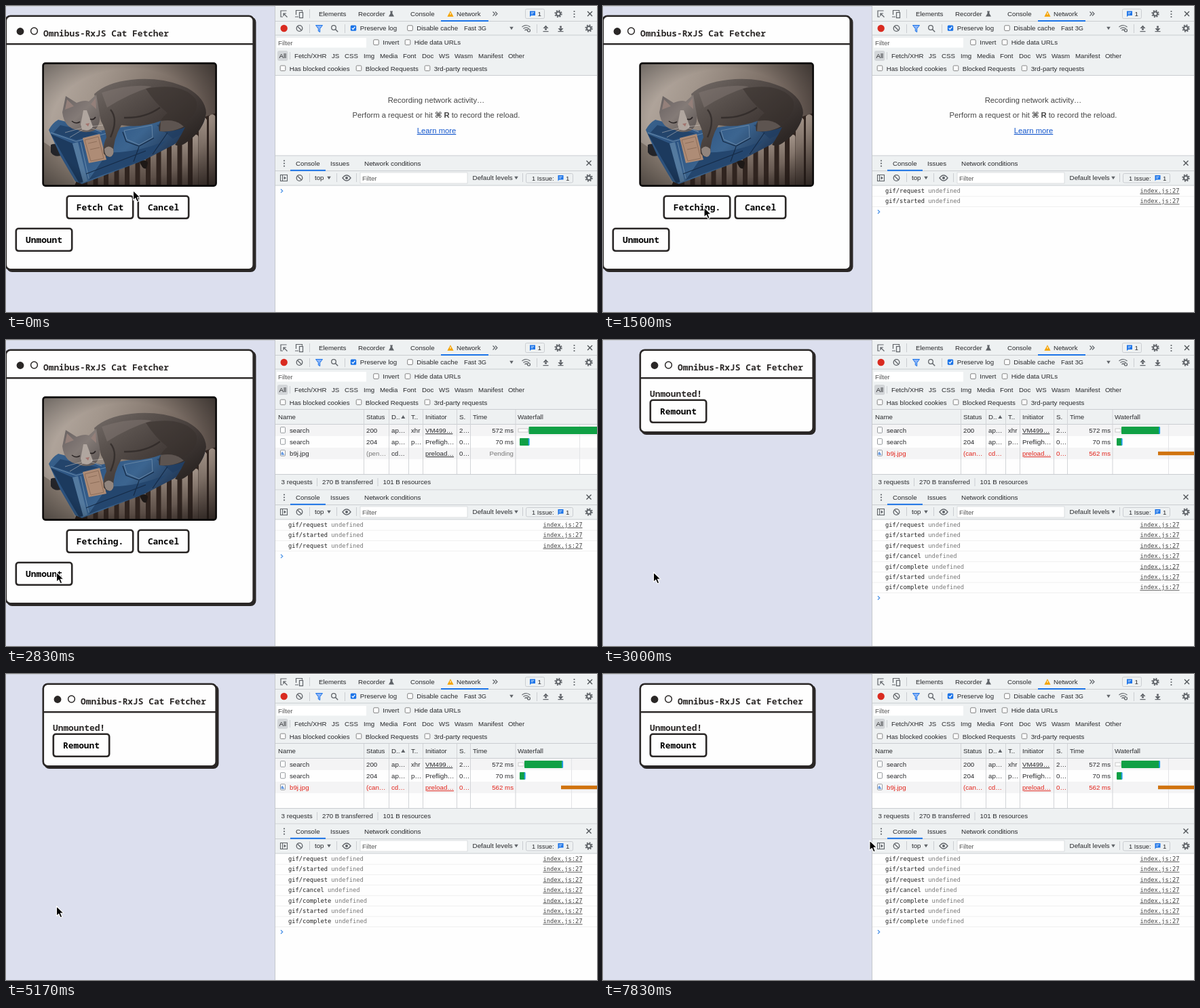
An HTML page that plays this animation: 871x452 px, repeating every 8000 ms.

```html
<!DOCTYPE html>
<html lang="en">
<head>
<meta charset="utf-8">
<title>Cat Fetcher</title>
<style>
  html, body { margin: 0; width: 100%; height: 100%; overflow: hidden; background: #dcdfee; }
  svg { display: block; width: 871px; height: 452px; }
  text { font: 9.7px "Liberation Sans", "DejaVu Sans", sans-serif; white-space: pre; }
  .app { font: 600 12.85px "Noto Sans Mono", "DejaVu Sans Mono", monospace; }
  .button { font-weight: 700; }
  .log { font: 8.78px "DejaVu Sans Mono", monospace; }
  .link { text-decoration: underline; }
</style>
</head>
<body>
<svg id="stage" viewBox="0 0 871 452"></svg>
<script>
const INK = '#2a2726', ICON = '#5f6368', TEXT = '#28292c', GRAY = '#777', BLUE = '#1a73e8', RED = '#e2231a';
const GREEN = '#10a045', LINE = '#cacdd1', PANEL = '#eef1f2', PAPER = '#fefefe';

// Drawing helpers: each returns SVG markup.
const rect = (x, y, w, h, fill, extra = '') =>
  `<rect x="${x}" y="${y}" width="${w}" height="${h}" fill="${fill}" ${extra}/>`;
const circle = (x, y, r, fill, extra = '') => `<circle cx="${x}" cy="${y}" r="${r}" fill="${fill}" ${extra}/>`;
const path = (d, fill, extra = '') => `<path d="${d}" fill="${fill}" ${extra}/>`;
const stroke = (d, color = ICON, width = 1.2, extra = '') =>
  path(d, 'none', `stroke="${color}" stroke-width="${width}" ${extra}`);
const text = (x, y, s, fill = TEXT, extra = '') => `<text x="${x}" y="${y}" fill="${fill}" ${extra}>${s}</text>`;
const sized = px => `style="font-size:${px}px"`;
const group = (id, content) => `<g id="${id}">${content}</g>`;
const hline = (y, color = LINE) => rect(397, y, 474, 1, color);
const vline = (x, y, h, color = LINE) => rect(x, y, 1, h, color);

// Icons
const gear = (x, y) => circle(x, y, 3, 'none', `stroke="${ICON}" stroke-width="2"`) +
  circle(x, y, 4.8, 'none', `stroke="${ICON}" stroke-width="1.8" stroke-dasharray="1.9 1.87"`);
const cross = (x, y) => stroke(`M${x - 3.5} ${y - 3.5}l7 7m0-7l-7 7`, '#4b4f53', 1.3);
const dots = (x, y) => [-4, 0, 4].map(d => circle(x, y + d, 1.1, ICON)).join('');
const clearIcon = (x, y) => circle(x, y, 4.3, 'none', `stroke="${ICON}" stroke-width="1.3"`) +
  stroke(`M${x - 3} ${y - 3}l6 6`, ICON, 1.3);
const triangle = (x, y) => path(`M${x - 2.8} ${y - 2.3}h5.6l-2.8 4.6z`, ICON);
const checkbox = (x, y, on) => on
  ? rect(x - 4.2, y - 4.2, 8.4, 8.4, BLUE, 'rx="1.5"') + stroke(`M${x - 2.3} ${y}l1.7 1.9l3-3.9`, '#fff', 1.3)
  : rect(x - 3.8, y - 3.8, 7.6, 7.6, '#fff', 'rx="1.3" stroke="#767676" stroke-width=".9"');
const message = (x, y) => path(`M${x} ${y}h8v6.5h-6l-2 2z`, BLUE) +
  stroke(`M${x + 1.7} ${y + 2.2}h4.6m-4.6 2h3`, '#fff', .8);
const arrowIcon = (x, y, dir) => path(`M${x - 4} ${y}h8l-4 ${-4.5 * dir}zM${x - 1.4} ${y - .5}h2.8v${3 * dir}h-2.8z`, ICON) +
  rect(x - 4, y + 4, 8, 1.2, ICON);

// Left-hand application: boxes are given by the centre line of their border.
const border = `stroke="${INK}" stroke-width="2.6"`;
const windowFrame = (x, w, h) =>
  rect(x + 2, 16, w + 1, h + 1, INK, 'rx="8"') +
  rect(x + .8, 14.8, w - 1.6, h - 1.6, PAPER, `rx="6.7" ${border}`) +
  rect(x + 1, 55, w - 2, 2.4, INK) +
  circle(x + 22, 37.5, 5.4, INK) +
  circle(x + 42.5, 37, 4.9, PAPER, `stroke="${INK}" stroke-width="1.5"`) +
  text(x + 56, 44.5, 'Omnibus-RxJS Cat Fetcher', INK, 'class="app"');
const button = (x, y, w, label, id = '') =>
  rect(x + .8, y + .8, w - 1.6, 33, PAPER, `rx="3.7" ${border}`) +
  text(x + w / 2, y + 21.5, label, '#000', `class="app button" text-anchor="middle" ${id && `id="${id}"`}`);

const gradient = (id, end, ...colors) => `<linearGradient id="${id}" ${end}>` +
  colors.map((c, i) => `<stop offset="${i / (colors.length - 1)}" stop-color="${c}"/>`).join('') + '</linearGradient>';

function photo() {
  let ribs = '';
  for (let x = 120, i = 0; x < 285; x += 15.5, i++)
    ribs += rect(x, 190, 8.5, 80, 'url(#rib)', 'rx="4"');
  const jeans = 'M63 183Q68 173 77 168L140 184L215 172L289 157L294 161Q293 174 284 181L247 205L203 228L112 263L102 259L80 221Z';
  return '<defs>' +
    gradient('wall', 'x2="1" y2=".35"', '#bcb1a8', '#a3978d', '#80736a', '#5c504a') +
    gradient('rib', 'x2="0" y2="1"', '#a39489', '#75675e', '#4b3e38') +
    gradient('denim', 'x2=".9" y2=".4"', '#3c658e', '#2c5381', '#3c6590', '#1d3250') +
    gradient('fur', 'x2=".8" y2=".8"', '#756d69', '#5a524e', '#453d3a', '#2d2725') +
    gradient('face', 'x2="1" y2="1"', '#676060', '#847b77', '#5a5351') +
    `<radialGradient id="shade" r=".75"><stop offset=".6" stop-opacity="0"/><stop offset="1" stop-opacity=".5"/></radialGradient>
    <filter id="soft"><feGaussianBlur stdDeviation=".6"/></filter>
    <clipPath id="frame"><rect x="54" y="84" width="256" height="182" rx="4"/></clipPath></defs>
  <g clip-path="url(#frame)">` +
    rect(54, 84, 256, 182, 'url(#wall)') +
    `<g filter="url(#soft)">` +
    path('M54 200L84 220L104 268H54Z', '#85796f') +
    path('M104 258L215 215L289 165L310 158V268H100Z', '#30241f') + ribs +
    path('M284 168q7-8 12 0V268h-12zM299 163q5-6 10 0V268h-10z', 'url(#rib)') +
    path('M66 205q8-4 16 4l-1 12q-10 3-15-5z', '#25262b') +
    path(jeans, 'url(#denim)') +
    path('M66 189L98 203L117 258L108 262L87 226Z', '#1c3a5e') +
    path('M98 203l8-2l14 57l-6 3z', '#547a9f') +
    path('M80 176L136 188L104 198L70 187Z', '#23446b') +
    path('M150 216Q190 218 236 199L204 227L122 257Z', '#24466e') +
    path('M222 176L290 159Q288 174 246 196Z', '#203c60', 'opacity=".7"') +
    stroke('M66 187l37 13l61-16M110 201l12 54', '#6f90af', .9) +
    stroke('M174 184l41-8l1 18l-20 11l-18-8z', '#7290ad', .8) +
    stroke('M172 186l5 14l19 7l22-12M196 208l-8 22M238 187l-22 32M118 248l88-34', '#152b47', 1.2) +
    path('M197 230q10-5 12 2l-2 8q-6 2-10-10z', '#1d1816') +
    path('M113 195L138 189L148 227L122 232Z', '#ae8c76') +
    stroke('M116 198l20-5l8 32l-19 4zM121 203l13-3M124 212l14-3', '#8a6a56', .9) +
    path('M130 130Q148 113 184 109Q230 104 267 121Q294 136 295 158Q291 184 268 200Q257 209 249 205Q258 192 264 179Q245 187 226 185Q224 176 230 169Q199 181 170 176Q158 196 158 219Q151 227 144 218Q142 207 148 194Q146 180 140 170Z', 'url(#fur)') +
    path('M206 122Q260 112 279 137Q288 157 258 176Q233 179 226 184Q222 171 238 158Q219 143 206 122Z', '#38302d', 'opacity=".55"') +
    path('M141 128Q183 114 215 119Q180 130 149 150Z', '#857b76', 'opacity=".45"') +
    path('M228 170Q250 166 262 178Q246 187 227 185Z', '#5d5450') +
    stroke('M154 153Q166 167 154 194M174 165Q205 166 227 150', '#2c2624', 2.4, 'opacity=".7"') +
    path('M145 211q6-7 13 0q2 10-5 12q-8-1-8-12z', '#91857e') +
    path('M83 157L88 133L104 143Q116 138 122 141L133 131L137 154Q142 173 130 184Q116 189 106 183Q86 181 83 157Z', 'url(#face)') +
    path('M87 153L90 138L100 148ZM125 145L132 136L133 152Z', '#94807a') +
    path('M114 154L119 154L128 178Q122 187 112 182L110 175Z', '#b0a69f') +
    stroke('M97 170q6 5 12 1M124 167q5 2 8-3', '#2a2424', 1.6) +
    path('M117 174l6-1l-2 5z', '#a2746e') + '</g>' +
    stroke('M112 180l-25 7M114 182l-20 12M125 178l18-2M125 180l16 6', '#ddd6cf', .6, 'opacity=".8"') +
    rect(54, 84, 256, 182, 'url(#shade)') + '</g>' +
    rect(54.6, 84.6, 255, 181, 'none', 'rx="3.5" stroke="#0b0909" stroke-width="2.6"');
}

const mounted = group('mounted', windowFrame(-1, 366.5, 376) + photo() +
  button(89, 280, 99, 'Fetch Cat', 'fetch') + button(194, 280, 76, 'Cancel') + button(14, 328, 84, 'Unmount'));
const unmounted = group('unmounted', windowFrame(54, 256.5, 123) +
  text(69, 83.5, 'Unmounted!', INK, 'class="app"') + button(69, 88, 84, 'Remount'));

// Developer tools that never change
const filterTypes = { 'Fetch/XHR': 425, JS: 480, CSS: 499, Img: 527, Media: 551, Font: 585, Doc: 613,
  WS: 638, Wasm: 661, Manifest: 696, Other: 740 };
const labelled = (x, y, label, on) => checkbox(x, y - 3.6, on) + text(x + 9.7, y, label);

const chrome = rect(0, 0, 871, 1, '#cfd1d8') + rect(396, 0, 475, 452, PAPER) + vline(396, 0, 452, '#c5c8cc') +
  rect(397, 1, 474, 101, PANEL) + hline(22) + hline(42.5) + hline(102) +
  stroke('M413 7.5v-.5h-8v9h3M409 11l5.5 5.5M409 15v-4h4') +
  stroke('M427.5 13V6.5h9v2M426 16h5') + rect(432.5, 9.5, 5, 8, PANEL, `stroke="${ICON}" stroke-width="1.2"`) +
  vline(447, 5, 13) + text(461, 15, 'Elements') + text(519, 15, 'Recorder') +
  path('M566 7.5h4v1h-.6v2.5l2.6 4.5h-8l2.6-4.5V8.5h-.6z', ICON) +
  text(596, 15, 'Console') + path('M655 7.3l4.6 8.5h-9.2z', '#f5a300') + rect(654.5, 10, 1, 3, '#fff') +
  text(664, 15, 'Network') + rect(641, 21, 70, 2, BLUE) +
  stroke('M717.5 8.5l3 3l-3 3m3.5-6l3 3l-3 3') +
  rect(765.5, 4.5, 28, 14, PANEL, `rx="2" stroke="${LINE}"`) + message(772, 7.5) + text(783.5, 15, '1') +
  gear(814, 11.5) + dots(837.5, 12) + cross(860.5, 11.5) +

  circle(409.7, 33, 5.2, '#d92b20') + clearIcon(432.5, 33) + vline(447, 27, 13) +
  path('M456.5 28.5h10l-3.8 5v5l-2.4-1.4v-3.6z', '#8ab4f8', `stroke="${BLUE}"`) +
  circle(483, 32, 3.3, 'none', `stroke="${ICON}" stroke-width="1.3"`) + stroke('M485.5 34.5l3.7 3.7', ICON, 1.4) +
  vline(499, 27, 13) + labelled(512, 36.2, 'Preserve log', true) + labelled(595.5, 36.2, 'Disable cache') +
  text(675, 36.4, 'Fast 3G', TEXT, sized(9.3)) + triangle(745, 33) +
  stroke('M760.5 31q6-5 12 0M762.5 33.5q4-3.3 8 0M764.5 36q2-2 4 0', ICON, 1.2) +
  circle(770.5, 36, 2, PANEL, `stroke="${ICON}" stroke-width="1.2"`) +
  vline(782, 27, 13) + arrowIcon(795.5, 33, 1) + arrowIcon(817.5, 33, -1) + gear(859, 33) +

  rect(399, 47, 132, 14.5, '#fff') + text(401, 58, 'Filter', '#555') +
  labelled(545.5, 57.2, 'Invert') + labelled(592, 57.2, 'Hide data URLs') +
  rect(400, 66, 15.5, 15, '#d3d6d9', 'rx="3"') + text(402.5, 76.5, 'All') + vline(418, 68, 11) +
  Object.entries(filterTypes).map(([label, x]) => text(x, 76.5, label)).join('') +
  labelled(408, 95.5, 'Has blocked cookies') + labelled(520, 95.5, 'Blocked Requests') +
  labelled(621, 95.5, '3rd-party requests') +

  rect(397, 221, 474, 44, PANEL) + hline(220.5) + hline(243) + hline(264.5) + dots(410, 232.5) +
  text(427, 235.7, 'Console') + rect(419, 241.8, 52, 2, BLUE) + text(478, 235.7, 'Issues') +
  text(528, 235.7, 'Network conditions', TEXT, sized(9.9)) + cross(859, 232) +
  rect(404.5, 249.5, 10, 9, 'none', `stroke="${ICON}" stroke-width="1.1"`) + vline(407, 249, 9, ICON) +
  path('M409.5 251.5v5l3.5-2.5z', ICON) + clearIcon(432.5, 254) + vline(447, 247, 13) +
  text(455, 257.3, 'top') + triangle(476, 254) + vline(487, 247, 13) +
  stroke('M496 254q6-8 12 0q-6 8-12 0z', ICON, 1.3) + circle(502, 254, 2, ICON) + vline(516, 247, 13) +
  rect(522, 246, 158, 16, '#fff', `stroke="${LINE}" stroke-width=".6"`) + text(525, 257.5, 'Filter', '#555') +
  text(687.5, 257.3, 'Default levels', TEXT, sized(9.9)) + triangle(752, 254) + vline(761, 247, 13) +
  rect(766.5, 247.5, 69, 13.5, PANEL, `rx="2" stroke="${LINE}"`) + text(775, 257.5, '1 Issue:', TEXT, sized(9.3)) +
  message(813.5, 250) + text(825, 257.5, '1') + gear(859, 254);

const middle = `text-anchor="middle" style="font-size:11.25px"`;
const idle = group('idle',
  text(634, 143, 'Recording network activity…', '#444', middle) +
  text(634, 165.3, 'Perform a request or hit <tspan font-weight="bold">⌘ R</tspan> to record the reload.', '#444', middle) +
  text(634.5, 188, 'Learn more', '#1155cc', middle + ' class="link"'));

// Network table
function tableRow(i, [name, status, domain, type, initiator, size, time], color = TEXT) {
  const base = 137.2 + 17 * i, icon = base - 8.5;
  const pending = time === 'Pending' ? GRAY : color;
  const cells = [[418, name], [531, status, pending], [568, domain], [597, type], [668, size]];
  return (i % 2 ? '' : rect(397, 125 + 17 * i, 474, 17, '#f4f4f5')) +
    rect(404.5, icon, 7, 8.5, '#fff', 'rx="1" stroke="#8b8f94" stroke-width=".9"') +
    (i === 2 ? path(`M405.5 ${icon + 7}v-3l2-2l3 5z`, '#6a9be0') : '') +
    cells.map(([x, s, fill = color]) => text(x, base, s, fill)).join('') +
    text(618, base, initiator, color, i === 1 ? '' : 'class="link"') +
    text(748, base, time, pending, 'text-anchor="end"');
}
const greenBar = (x, end, y) => rect(x, y, end - x, 11, GREEN, 'rx="1"') + rect(end - 1.2, y + .5, 1.8, 10, '#1f9bef');
const queueBar = end => rect(755, 131, end - 755, 5, '#fff', 'stroke="#c4c4c4" stroke-width=".9"');
const tick = rect(756, 148, 1, 5, '#aaa');

function table(id, rows, gridX, bars, [requests, sent, resources], resourcesX) {
  const heads = [[401, 'Name'], [531, 'Status'], [568, 'D..'], [597, 'T..'], [618, 'Initiator'], [668, 'S.'], [688, 'Time'], [754, 'Waterfall']];
  return group(id, rect(397, 103, 474, 21, PANEL) + rows + hline(124) +
    [527, 564, 593, 614, 664, 684, 750.5].map(x => vline(x, 103, 95, '#d2d4d7')).join('') +
    heads.map(([x, s]) => text(x, 117.3, s)).join('') + path('M582.3 116l3-5l3 5z', ICON) +
    vline(gridX, 125, 73, '#e3e4e6') + bars +
    rect(397, 199, 474, 21, PANEL) + hline(198) +
    text(405.5, 213.3, requests, TEXT, sized(9.9)) + vline(458, 204, 12) + text(466, 213.3, sent) +
    vline(resourcesX - 8, 204, 12) + text(resourcesX, 213.3, resources));
}
const preflight = tableRow(1, ['search', '204', 'ap…', 'p…', 'Prefligh…', '0…', '70 ms']);
const searchRow = (status, size, time) => tableRow(0, ['search', status, 'ap…', 'xhr', 'VM499…', size, time]) + preflight;
const imageRow = (status, time, color) => tableRow(2, ['b9j.jpg', status, 'cd…', '', 'preload…', '0…', time], color);
const done = searchRow('200', '2…', '572 ms');
const loaded = ['3 requests', '270 B transferred', '101 B resources'];

const tables =
  table('searching', searchRow('(pen…', '0…', 'Pending'), 810,
    rect(755, 131, 82, 5, '#808080') + tick + greenBar(758.5, 839, 145),
    ['2 requests', '0 B transferred', '0 B resources'], 545) +
  table('loading', done + imageRow('(pen…', 'Pending'), 845,
    queueBar(769.5) + greenBar(770.5, 885, 128) + greenBar(757, 771, 145), loaded, 555.5) +
  table('canceled', done + imageRow('(can…', '562 ms', RED), 833,
    queueBar(763) + greenBar(764, 820.5, 128) + greenBar(757, 765, 145) + rect(818, 164.8, 53, 5.4, '#d0730f'), loaded, 555.5);

// Console output
const PITCH = 15.4;
const actions = ['request', 'started', 'request', 'cancel', 'complete', 'started', 'complete'];
const logs = actions.map((action, i) => {
  const y = 276 + PITCH * i;
  return `<g class="entry">${text(416, y, `gif/${action} <tspan fill="${GRAY}">undefined</tspan>`, '#222', 'class="log"')}
    ${text(849.5, y, 'index.js:27', '#444', 'class="log link" text-anchor="end"')}${hline(y + 4.6, '#efefef')}</g>`;
}).join('');
const prompt = group('prompt', stroke('M405 270.5l2.7 2.7l-2.7 2.7', '#4d94e8', 1.3));
const pointer = group('pointer', path('M0 0V14.4L3.3 11.4L5.7 16.8L8.3 15.7L6 10.3H10.6Z', '#000',
  'stroke="#fff" stroke-width="1.1" stroke-linejoin="round"'));

document.getElementById('stage').innerHTML =
  rect(0, 0, 871, 452, '#dcdfee') + mounted + unmounted + chrome + idle + tables + logs + prompt + pointer;

// Timeline
const LOOP = 8000, STEP = 1000 / 6;
const CLICK = 1500, REQUEST = 1667, RESPONSE = 2333, UNMOUNT = 3000;
const pointerKeys = [[0, 187.5, 272.5], [500, 187.5, 272.5], [833, 172.5, 278], [1167, 149, 297.5],
  [2333, 149, 297.5], [2800, 74.5, 343], [7100, 74.5, 343], [7800, 393, 246], [LOOP, 393, 246]];
const $ = id => document.getElementById(id);
const entries = [...document.querySelectorAll('.entry')];
const show = (el, visible) => { el.style.display = visible ? '' : 'none'; };

function pointerAt(t) {
  const i = pointerKeys.findIndex(key => key[0] > t);
  const [t0, x0, y0] = pointerKeys[i - 1], [t1, x1, y1] = pointerKeys[i];
  const p = (t - t0) / (t1 - t0), ease = p * p * (3 - 2 * p);
  return [x0 + (x1 - x0) * ease, y0 + (y1 - y0) * ease];
}

function render(time) {
  const t = Math.min(Math.floor((time % LOOP + 5) / STEP) * STEP + 1, LOOP - 1);
  const network = t < REQUEST ? 'idle' : t < RESPONSE ? 'searching' : t < UNMOUNT ? 'loading' : 'canceled';
  for (const id of ['idle', 'searching', 'loading', 'canceled']) show($(id), id === network);
  show($('mounted'), t < UNMOUNT);
  show($('unmounted'), t >= UNMOUNT);
  $('fetch').textContent = t < CLICK ? 'Fetch Cat' : 'Fetching.';
  const count = t < CLICK ? 0 : t < RESPONSE ? 2 : t < UNMOUNT ? 3 : actions.length;
  entries.forEach((entry, i) => show(entry, i < count));
  $('prompt').setAttribute('transform', `translate(0 ${count * PITCH})`);
  $('pointer').setAttribute('transform', `translate(${pointerAt(t)})`);
}

const start = performance.now();
(function tick() {
  render(performance.now() - start);
  requestAnimationFrame(tick);
})();
</script>
</body>
</html>
```
